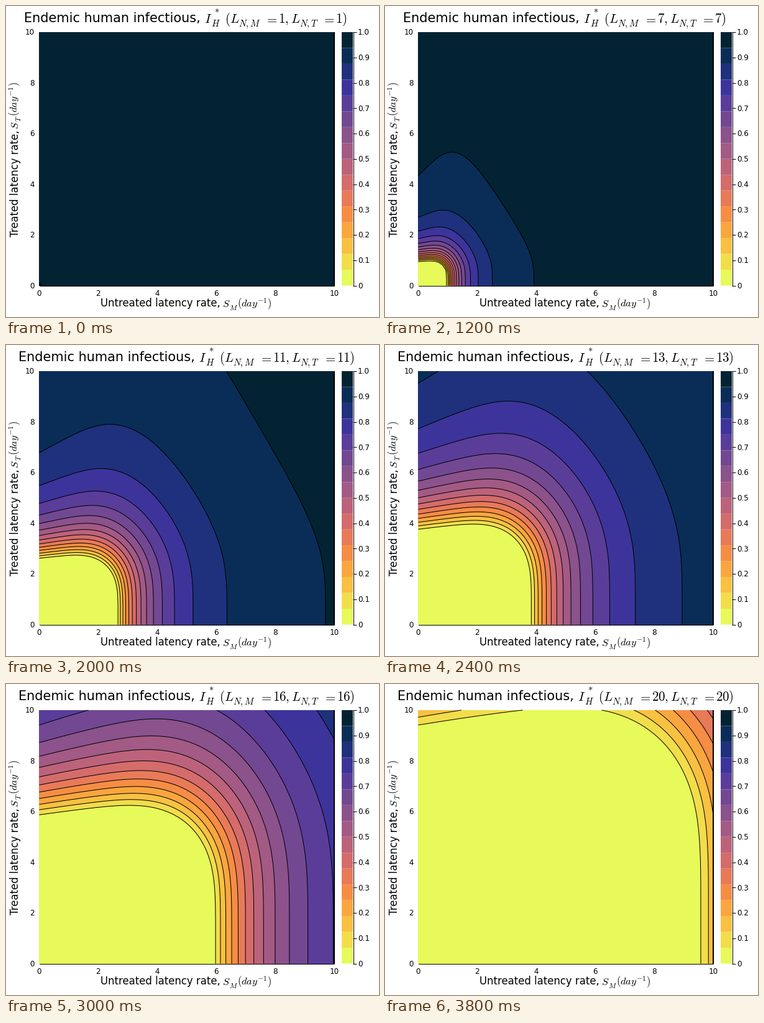
Animation, 600 px wide and 500 px high, one loop 4000 ms. Source, as a matplotlib script:

```python
import numpy as np
import matplotlib.pyplot as plt
from matplotlib.animation import FuncAnimation
from matplotlib.colors import LinearSegmentedColormap
from matplotlib.patches import Rectangle

plt.rcParams["font.family"] = "DejaVu Sans"
plt.rcParams["mathtext.fontset"] = "cm"

W, H, DPI = 600, 500, 100
PX = 72 / DPI
LEFT, RIGHT, TOP, BOTTOM = 53.5, 528, 42, 449.5
BAR_LEFT, BAR_RIGHT = 540, 558
BANDS = 16
TITLE, LABEL, TICK = 21, 16.5, 12

THERMAL = [(3, 35, 51), (13, 48, 100), (53, 50, 155), (93, 62, 153),
           (126, 77, 143), (158, 89, 135), (193, 100, 121), (225, 113, 97),
           (246, 139, 69), (251, 173, 60), (246, 211, 70), (231, 250, 90)]
cmap = LinearSegmentedColormap.from_list(
    "thermal_r", np.array(THERMAL[::-1]) / 255, N=1024)
colors = [cmap(k / (BANDS - 1)) for k in range(BANDS)]
levels = np.linspace(0, 1, BANDS + 1)

rate = np.linspace(0, 10, 101)
S_M, S_T = np.meshgrid(rate, rate)


def px_x(s):
    return LEFT + (RIGHT - LEFT) * s / 10


def px_y(s):
    return BOTTOM - (BOTTOM - TOP) * s / 10


def survival(s, n):
    """Chance of passing n latent stages whose loss rate grows by stage."""
    p = np.ones_like(s)
    for i in range(1, n + 1):
        p = p * s / (s + 0.25 * i)
    return p


def endemic(n):
    """Endemic infectious share, the positive root of a quadratic."""
    c, d = 0.66, 1.11
    shade = 0.52 + 0.48 * np.exp(-8.5 / n ** 1.3 * S_M)
    a = 122.5 * survival(S_M, n)
    b = 135.2 * shade * survival(S_T, n)
    p, q = a + b, a * d + b * c
    k2, k1, k0 = c * d + q, c + d + p - q, 1 - p
    root = (-k1 + np.sqrt(np.maximum(k1 * k1 - 4 * k2 * k0, 0))) / (2 * k2)
    return np.where(p > 1, np.clip(root, 1e-9, 1), 1e-9)


fig = plt.figure(figsize=(W / DPI, H / DPI), dpi=DPI, facecolor="white")
ax = fig.add_axes([0, 0, 1, 1])
ax.set_xlim(0, W)
ax.set_ylim(H, 0)
ax.axis("off")


def label(x, y, s, size, ha="left", rotation=0):
    return ax.text(x, y, s, fontsize=size * PX, ha=ha, va="baseline",
                   rotation=rotation, rotation_mode="anchor")


def math_row(x, y, size, pieces, rotation=0):
    """Set (tex, advance in em, is subscript) pieces along a baseline."""
    texts = []
    for tex, advance, sub in pieces:
        scale, drop = (0.7, 0.29 * size) if sub else (1, 0)
        pos = (x + drop, y) if rotation else (x, y + drop)
        texts.append(label(*pos, f"${tex}$", size * scale, rotation=rotation))
        if rotation:
            y -= advance * size
        else:
            x += advance * size
    return texts


def line(x, y, width=1, z=5):
    ax.plot(x, y, color="black", lw=width * PX, zorder=z,
            solid_capstyle="butt")


# Axes and their labels
line([LEFT, LEFT], [TOP, BOTTOM + 0.5], z=0)
line([LEFT, RIGHT], [BOTTOM, BOTTOM], z=0)
line([RIGHT, RIGHT], [TOP, BOTTOM + 0.5], 2)
for v in range(0, 11, 2):
    label(px_x(v), 466, str(v), TICK, "center")
    label(45.5, px_y(v) + 4.4, str(v), TICK, "right")


def rate_symbol(sub, advance):
    return [("S", 0.67, False), (sub, advance, True),
            ("(day^{-1})", 0, False)]


label(151.5, 483, "Untreated latency rate,", LABEL)
math_row(347.5, 484, LABEL, rate_symbol("M", 0.8))
label(20, 371, "Treated latency rate,", LABEL, rotation=90)
math_row(19.5, 197.5, LABEL, rate_symbol("T", 0.55), rotation=90)

# Colour bar
step = (BOTTOM - TOP) / BANDS
for k, color in enumerate(colors):
    ax.add_patch(Rectangle((BAR_LEFT, BOTTOM - (k + 1) * step),
                           BAR_RIGHT - BAR_LEFT, step, fc=color, lw=0,
                           snap=False))
line([BAR_RIGHT + 0.5] * 2, [TOP, BOTTOM + 0.5])
for k in range(11):
    y = px_y(k)
    line([BAR_RIGHT, BAR_RIGHT + 6], [y, y])
    label(566, y + 4.4, "0" if k == 0 else f"{k / 10:.1f}", TICK)


def draw_title(n):
    digits = len(str(n))
    x = 29 - 9 * (digits - 1)
    texts = [label(x, 26, "Endemic human infectious,", TITLE - 0.1),
             label(x + 306, 11, "$*$", TITLE * 0.7)]
    texts += math_row(x + 290, 27, TITLE, [
        ("I", 0.53, False), ("H", 1.02, True),
        ("(L", 1.07, False), ("N,M", 1.98, True), ("=", 1.055, False),
        (f"{n},", 0.5 * digits + 0.445, False),
        ("L", 0.68, False), ("N,T", 1.735, True), ("=", 1.055, False),
        (f"{n})", 0, False)])
    return texts


drawn = []


def update(frame):
    n = frame + 1
    while drawn:
        drawn.pop().remove()
    z = endemic(n)
    x, y = px_x(rate), px_y(rate)
    drawn.append(ax.contourf(x, y, z, levels=levels, colors=colors, zorder=1))
    drawn.append(ax.contour(x, y, z, levels=levels[1:-1], colors="black",
                            linewidths=PX, zorder=2))
    drawn.extend(draw_title(n))
    return []


anim = FuncAnimation(fig, update, frames=20, interval=200, repeat=True,
                     repeat_delay=0, init_func=lambda: [], blit=False)
plt.show()
```
